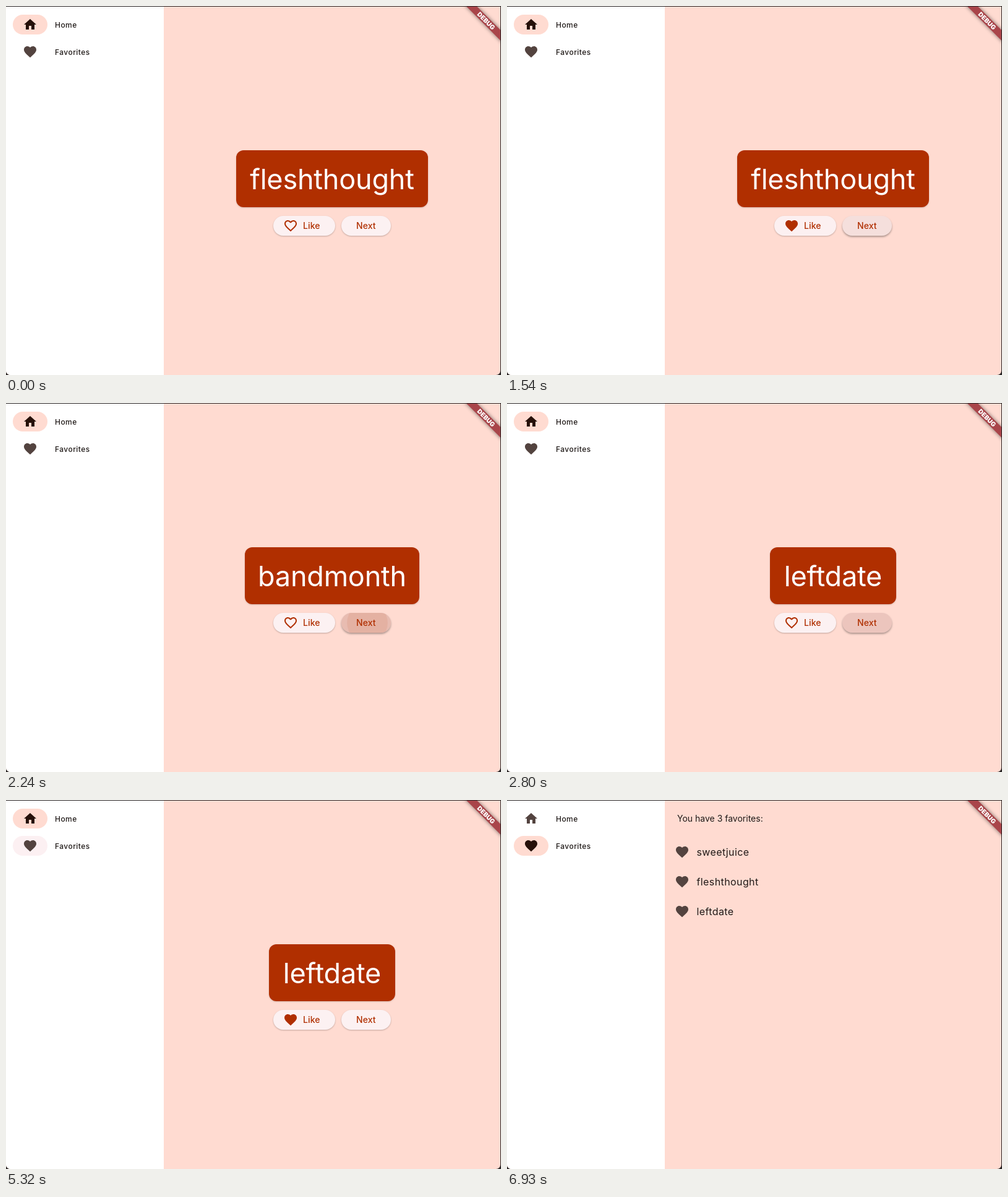
An HTML page for the animation above (8120 ms loop, 800 by 596 pixels).

```html
<!DOCTYPE html>
<html lang="en">
<head>
<meta charset="utf-8">
<title>Word pairs</title>
<style>
  html, body { margin: 0; width: 100%; height: 100%; overflow: hidden; background: #2b2626; }
  svg { display: block; }
  #stage { clip-path: inset(1px 1px 0 0 round 0 0 7px 7px); font-family: Inter, Roboto, sans-serif; fill: #201a18; }
  .label { font-size: 12px; font-weight: 500; letter-spacing: .45px; }
  .item { font-size: 16px; letter-spacing: .4px; }
  .button text { font-size: 14px; font-weight: 500; letter-spacing: .1px; }
  .button { fill: #b02f00; }
  #word { font-size: 45px; letter-spacing: -.2px; fill: #fff; text-anchor: middle; }
  #card { fill: #b02f00; filter: drop-shadow(0 1px 1px rgba(0,0,0,.16)); }
  #banner rect { fill: #a9454a; filter: drop-shadow(0 0 3px rgba(0,0,0,.5)); }
  #banner text { font-size: 10.2px; font-weight: 900; fill: #fff; text-anchor: middle; }
</style>
</head>
<body>
<svg id="stage" width="800" height="596" viewBox="0 0 800 596">
  <defs>
    <path id="house" d="M10 20v-6h4v6h5v-8h3L12 3 2 12h3v8z"/>
    <path id="heart" d="M12 21.35l-1.45-1.32C5.4 15.36 2 12.28 2 8.5 2 5.42 4.42 3 7.5 3c1.74 0 3.41.81 4.5 2.09C13.09 3.81 14.76 3 16.5 3 19.58 3 22 5.42 22 8.5c0 3.78-3.4 6.86-8.55 11.54z"/>
    <path id="hollow" d="M16.5 3c-1.74 0-3.41.81-4.5 2.09C10.91 3.81 9.24 3 7.5 3 4.42 3 2 5.42 2 8.5c0 3.78 3.4 6.86 8.55 11.54L12 21.35l1.45-1.32C18.6 15.36 22 12.28 22 8.5 22 5.42 19.58 3 16.5 3zm-4.4 15.55l-.1.1-.1-.1C7.14 14.24 4 11.39 4 8.5 4 6.5 5.5 5 7.5 5c1.54 0 3.04.99 3.57 2.36h1.87C13.46 5.99 14.96 5 16.5 5c2 0 3.5 1.5 3.5 3.5 0 2.89-3.14 5.74-7.9 10.05z"/>
  </defs>
  <rect width="800" height="596" fill="#ffdbd1"/>
  <rect width="255" height="596" fill="#fff"/>

  <rect id="homePill" x="11" y="14" width="56" height="32" rx="16" fill="#ffdbd1"/>
  <rect id="hoverPill" x="11" y="58" width="56" height="32" rx="16" fill="#fcf0f2"/>
  <rect id="favPill" y="58" height="32" rx="16" fill="#ffdbd1"/>
  <use id="homeIcon" href="#house" x="27" y="18"/>
  <use id="favIcon" href="#heart" x="27" y="62"/>
  <text class="label" x="79" y="35">Home</text>
  <text class="label" x="79" y="79">Favorites</text>

  <g id="homePage">
    <rect id="card" y="233" height="92" rx="12"/>
    <text id="word" x="527" y="296"></text>
    <g id="like" class="button"></g>
    <g id="next" class="button"></g>
  </g>
  <g id="favPage">
    <text x="275" y="35" font-size="14">You have 3 favorites:</text>
  </g>

  <g id="banner" transform="translate(800 0) rotate(45)">
    <rect x="-44" y="28" width="88" height="12"/>
    <text y="37.7">DEBUG</text>
  </g>
</svg>
<script>
const LOOP = 8120, SWITCH = 5460;
const el = id => document.getElementById(id);
const set = (node, attrs) => { for (const k in attrs) node.setAttribute(k, attrs[k]); };
const ramp = (t, a, b) => Math.min(1, Math.max(0, (t - a) / (b - a)));
const mix = (a, b, p) => a + (b - a) * p;
const mixColor = (a, b, p) => `rgb(${a.map((v, i) => Math.round(mix(v, b[i], p)))})`;

const DARK = [38, 16, 9], MUTED = [83, 67, 63];
const WORDS = [
  { at: 0, text: "fleshthought", width: 310 },
  { at: 1960, text: "bandmonth", width: 282 },
  { at: 2610, text: "leftdate", width: 204 }
];
const BUTTONS = [
  { id: "like", x: 432, width: 100, textX: 480, text: "Like",
    hovers: [[1120, 1400], [3690, 4200]], clicks: [1150, 3690] },
  { id: "next", x: 542, width: 80, textX: 566, text: "Next",
    hovers: [[1470, 3220]], clicks: [1890, 2140, 2540] }
];

// Buttons: base pill, hover/press tint, one ripple per click, content
for (const b of BUTTONS) {
  const pill = `x="${b.x}" y="339" width="${b.width}" height="32" rx="16"`;
  const icon = b.id === "like" ? '<use id="likeIcon" x="448" y="343"/>' : "";
  el(b.id).innerHTML = `
    <clipPath id="${b.id}Clip"><rect ${pill}/></clipPath>
    <rect class="base" ${pill} fill="#fcf1f2"/>
    <rect class="tint" ${pill}/>
    <g clip-path="url(#${b.id}Clip)">
      ${b.clicks.map(() => `<circle cx="${b.x + b.width / 2 + 2}" cy="355"/>`).join("")}
    </g>${icon}
    <text x="${b.textX}" y="360">${b.text}</text>`;
  b.base = el(b.id).querySelector(".base");
  b.tint = el(b.id).querySelector(".tint");
  b.ripples = el(b.id).querySelectorAll("circle");
}

["sweetjuice", "fleshthought", "leftdate"].forEach((text, i) => {
  el("favPage").innerHTML += `<use href="#heart" x="271" y="${72 + 48 * i}" fill="#53433f"/>
    <text class="item" x="306.5" y="${90 + 48 * i}">${text}</text>`;
});

function drawButton(b, t) {
  const hover = Math.max(...b.hovers.map(([a, z]) => ramp(t, a, a + 70) - ramp(t, z, z + 70)));
  const press = Math.max(...b.clicks.map(c => ramp(t, c, c + 80) - ramp(t, c + 150, c + 350)));
  set(b.tint, { opacity: .09 * hover + .16 * press });
  b.base.style.filter =
    `drop-shadow(0 ${mix(1, 2, hover)}px ${mix(.8, 1.6, hover)}px rgba(0,0,0,${mix(.24, .32, hover)}))`;
  b.clicks.forEach((c, i) => set(b.ripples[i], {
    r: mix(14, 56, ramp(t, c, c + 225)),
    opacity: .12 * (ramp(t, c, c + 150) - ramp(t, c + 170, c + 400))
  }));
}

function draw(t) {
  const word = WORDS.filter(w => w.at <= t).pop();
  el("word").textContent = word.text;
  set(el("card"), { x: 527 - word.width / 2, width: word.width });
  const liked = (t >= 1220 && t < 1960) || t >= 3780;
  set(el("likeIcon"), { href: liked ? "#heart" : "#hollow" });
  BUTTONS.forEach(b => drawButton(b, t));

  // Navigation to the favorites page
  const p = ramp(t, SWITCH, SWITCH + 200), width = mix(22, 56, p);
  set(el("homePage"), { opacity: 1 - p });
  set(el("favPage"), { opacity: p });
  set(el("homePill"), { opacity: 1 - p });
  set(el("hoverPill"), { opacity: ramp(t, 5250, 5320) * (1 - p) });
  set(el("favPill"), { x: 39 - width / 2, width, opacity: ramp(p, 0, .5) });
  set(el("homeIcon"), { fill: mixColor(DARK, MUTED, p) });
  set(el("favIcon"), { fill: mixColor(MUTED, DARK, p) });
}

const start = performance.now();
function tick() {
  draw((performance.now() - start) % LOOP);
  requestAnimationFrame(tick);
}
tick();
</script>
</body>
</html>
```
